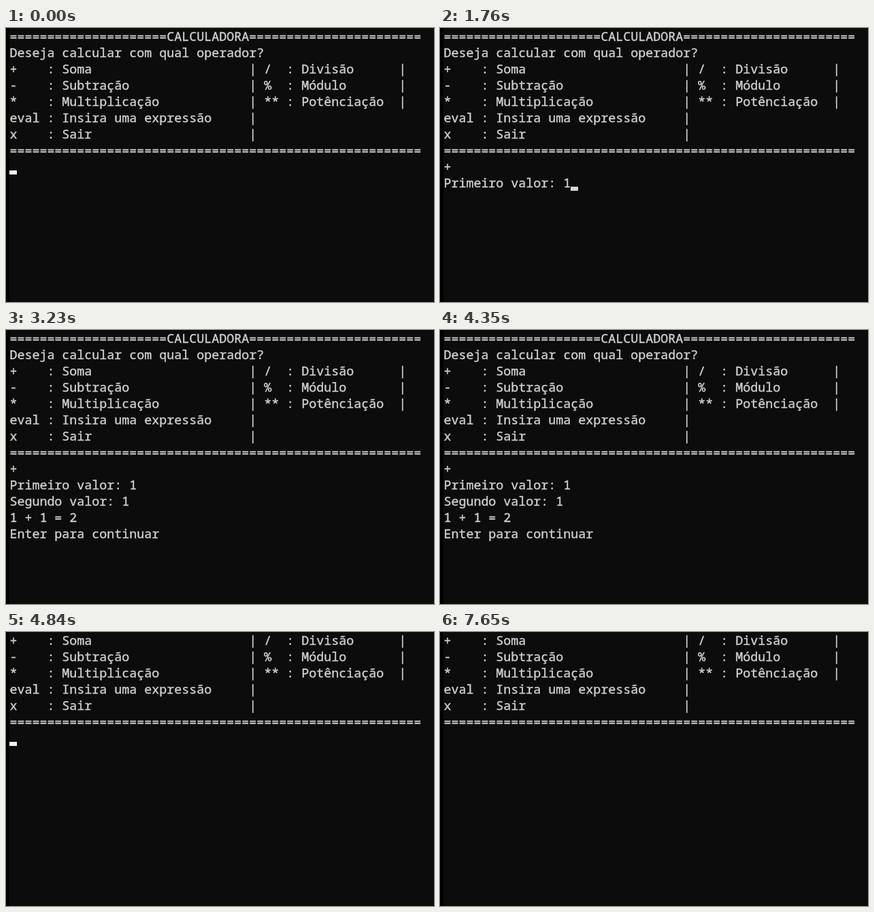
Animation of 629 by 404 pixels, one loop 7720 ms. Source, as an HTML page:

```html
<!DOCTYPE html>
<html lang="pt">
<head>
<meta charset="utf-8">
<title>Calculadora</title>
<style>
  html, body {
    margin: 0;
    width: 100%;
    height: 100%;
    overflow: hidden;
    background: #0c0c0c;
  }
  #edge {
    position: absolute;
    left: 0;
    top: 0;
    width: 5px;
    height: 100%;
    background: #000;
  }
  #screen {
    position: absolute;
    left: 5.4px;
    top: 0;
    margin: 0;
    color: #d0d0d0;
    font: 18.3333px/24px "Noto Sans Mono", "DejaVu Sans Mono", monospace;
    font-variant-ligatures: none;
    -webkit-text-stroke: 0.4px #d0d0d0;
    white-space: pre;
  }
  #cursor {
    position: absolute;
    width: 11px;
    height: 6px;
  }
</style>
</head>
<body>
<div id="edge"></div>
<pre id="screen"></pre>
<div id="cursor"></div>
<script>
const LOOP = 7720, CELL_W = 11, CELL_H = 24, LEFT = 5;
const BRIGHT = '#f2f2f2', DIM = '#d8d8d8', OFF = 'transparent';

const option = (key, label, key2, label2) =>
  (key.padEnd(5) + ': ' + label).padEnd(32) + '|' +
  (key2 ? (' ' + key2.padEnd(3) + ': ' + label2).padEnd(19) + '|' : '');

const options = [
  option('+', 'Soma', '/', 'Divisão'),
  option('-', 'Subtração', '%', 'Módulo'),
  option('*', 'Multiplicação', '**', 'Potênciação'),
  option('eval', 'Insira uma expressão'),
  option('x', 'Sair'),
  '='.repeat(55)
];
const menu = [
  '='.repeat(21) + 'CALCULADORA' + '='.repeat(23),
  'Deseja calcular com qual operador?',
  ...options
];

const first = 'Primeiro valor: ', second = 'Segundo valor: ';
const start = [...menu, ''];
const chosen = [...menu, '+'];
const answered = [...chosen, first + '1'];
const done = [...answered, second + '1', '1 + 1 = 2', 'Enter para continuar'];
const again = [...options, ''];

// time in ms, lines, cursor colour (always after the last character)
const steps = [
  [0, start, BRIGHT],
  [420, start, OFF],
  [990, start, BRIGHT],
  [1060, chosen, DIM],
  [1340, [...chosen, first], BRIGHT],
  [1760, answered, DIM],
  [1900, [...answered, second], BRIGHT],
  [2320, [...answered, second + '1'], DIM],
  [2390, done, BRIGHT],
  [3230, done, OFF],
  [3790, done, BRIGHT],
  [4350, done, OFF],
  [4770, [...done, ''], BRIGHT],
  [4840, again, BRIGHT],
  [5410, again, OFF],
  [5970, again, BRIGHT],
  [6530, again, OFF],
  [7090, again, BRIGHT],
  [7650, again, OFF]
];

const screenEl = document.getElementById('screen');
const cursorEl = document.getElementById('cursor');
const t0 = performance.now();
let shown = null;

function draw(now) {
  const t = Math.max(0, now - t0) % LOOP;
  const step = steps.findLast(s => s[0] <= t);
  if (step !== shown) {
    const [, lines, color] = step;
    screenEl.textContent = lines.join('\n');
    cursorEl.style.left = LEFT + lines.at(-1).length * CELL_W + 'px';
    cursorEl.style.top = lines.length * CELL_H - 6 + 'px';
    cursorEl.style.background = color;
    shown = step;
  }
  requestAnimationFrame(draw);
}
draw(t0);
</script>
</body>
</html>
```
